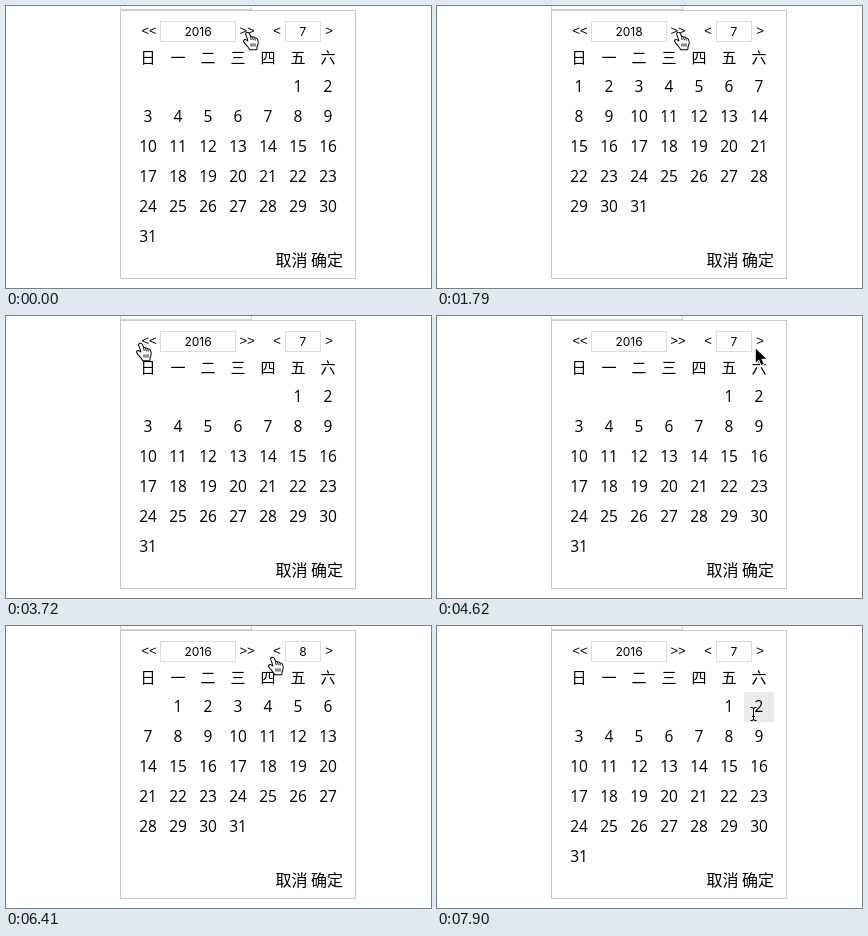
Write an HTML page with a canvas that moves like this. It is 425x282 px and loops after 8 s.

```html
<!DOCTYPE html>
<html lang="zh">
<head>
<meta charset="utf-8">
<title>Calendar</title>
<style>
html, body { margin: 0; width: 100%; height: 100%; overflow: hidden; background: #fff; }
canvas { display: block; width: 425px; height: 282px; }
</style>
</head>
<body>
<canvas id="stage"></canvas>
<script>
const W = 425, H = 282, LOOP = 8000;
const canvas = document.getElementById('stage');
const ctx = canvas.getContext('2d');
const dpr = window.devicePixelRatio || 1;
canvas.width = W * dpr;
canvas.height = H * dpr;

const DIGITS = '15.5px "Open Sans", sans-serif';
const ARROWS = '13px "Liberation Sans", sans-serif';
const FIELD = '12px Inter, sans-serif';
const CJK = '"Noto Sans CJK SC", "Noto Sans CJK", sans-serif';
const WEEKDAY = '15px ' + CJK;
const BUTTON = '16px ' + CJK;

// [start ms, year, month]
const months = [
  [0, 2016, 7], [300, 2017, 7], [1790, 2018, 7], [2980, 2017, 7],
  [3720, 2016, 7], [5220, 2016, 8], [6710, 2016, 7]
];

// [start ms, pointer shape, left, top]
const pointer = [
  [0, 'hand', 237, 26], [2090, 'beam', 212, 19], [2240, 'hand', 143, 27],
  [2530, 'hand', 134, 27], [2680, 'hand', 130, 27], [4170, 'beam', 200, 21],
  [4320, 'beam', 291, 23], [4470, 'beam', 306, 25], [4620, 'arrow', 318, 32],
  [4770, 'hand', 318, 32], [5820, 'beam', 286, 24], [5970, 'beam', 278, 24],
  [6110, 'beam', 276, 24], [6260, 'hand', 264, 32], [6410, 'hand', 262, 31],
  [7760, 'arrow', 273, 41], [7900, 'beam', 313, 80]
];
const HOVER_FROM = 7900;

const handPath = new Path2D(
  'M3.2 2.5Q2.8.9 4.3.8Q5.6.8 6.2 2.2L7.5 5.4Q8.6 4.7 9.7 5.8' +
  'Q10.9 5.2 11.8 6.5Q13.2 6.2 14 7.6Q15 9.6 14.5 11.8Q14.3 13.4 13.5 14.6' +
  'L13.4 17.2H7Q5.6 14.7 3.6 12.7Q1.7 10.9 1.1 9.3Q.9 8 2.2 7.9Q3.6 8.2 5.3 9.8L5.1 7.4Z');
const knuckles = new Path2D('M8 11.4V14.6M10 11.4V14.6M12 11.4V14.6M7.5 5.4L8.3 8M9.7 5.8L10.4 8.2M11.8 6.5L12.4 8.6');
const arrowPath = new Path2D('M.8.8V14.6L4 11.6L6.3 16.9L8.7 15.9L6.4 10.7H11.2Z');
const beamPath = new Path2D('M.5 1.5H2Q3.5 1.5 3.5 3Q3.5 1.5 5 1.5H6.5M3.5 3V13M.5 14.5H2Q3.5 14.5 3.5 13Q3.5 14.5 5 14.5H6.5M2 10.5H5');

const at = (list, t) => list.findLast(step => step[0] <= t);

function text(str, x, y, font, align = 'center') {
  ctx.font = font;
  ctx.textAlign = align;
  ctx.fillStyle = '#000';
  ctx.fillText(str, x, y);
}

function box(x, y, w, h, color) {
  ctx.strokeStyle = color;
  ctx.lineWidth = 1;
  ctx.strokeRect(x + .5, y + .5, w - 1, h - 1);
}

function drawHeader(year, month) {
  box(114, -20, 132, 24, '#d2d2d2');
  box(114, 4, 236, 269, '#c8c8c8');
  box(154, 15, 76, 21, '#ddd');
  box(279, 15, 36, 21, '#ddd');
  text('<<', 143, 29, ARROWS);
  text('>>', 241, 29, ARROWS);
  text('<', 271, 29, ARROWS);
  text('>', 323, 29, ARROWS);
  text(year, 192, 30, FIELD);
  text(month, 297, 30, FIELD);
  [...'日一二三四五六'].forEach((d, i) => text(d, 142 + i * 30, 57, WEEKDAY));
}

function drawDays(year, month) {
  const first = new Date(year, month - 1, 1).getDay();
  const count = new Date(year, month, 0).getDate();
  for (let d = 1; d <= count; d++) {
    const cell = first + d - 1;
    text(d, 142 + cell % 7 * 30, 86 + Math.floor(cell / 7) * 30, DIGITS);
  }
  text('取消 确定', 337, 260, BUTTON, 'right');
}

function outlined(path, fill, stroke, width) {
  ctx.lineJoin = 'round';
  ctx.lineWidth = width;
  ctx.fillStyle = fill;
  ctx.strokeStyle = stroke;
  ctx.stroke(path);
  ctx.fill(path);
}

function drawPointer([, shape, x, y]) {
  ctx.save();
  ctx.translate(x, y);
  if (shape === 'hand') {
    outlined(handPath, '#fff', '#000', 2);
    ctx.lineWidth = .9;
    ctx.stroke(knuckles);
  } else if (shape === 'arrow') {
    outlined(arrowPath, '#000', '#fff', 2);
  } else {
    ctx.strokeStyle = '#000';
    ctx.lineWidth = 1;
    ctx.stroke(beamPath);
  }
  ctx.restore();
}

function draw(t) {
  const [, year, month] = at(months, t);
  ctx.setTransform(dpr, 0, 0, dpr, 0, 0);
  ctx.fillStyle = '#fff';
  ctx.fillRect(0, 0, W, H);
  if (t >= HOVER_FROM) {
    ctx.fillStyle = '#ebebeb';
    ctx.fillRect(307, 66, 30, 30);
  }
  drawHeader(year, month);
  drawDays(year, month);
  drawPointer(at(pointer, t));
}

const start = performance.now();
function tick() {
  draw((performance.now() - start) % LOOP);
  requestAnimationFrame(tick);
}
tick();
</script>
</body>
</html>
```
